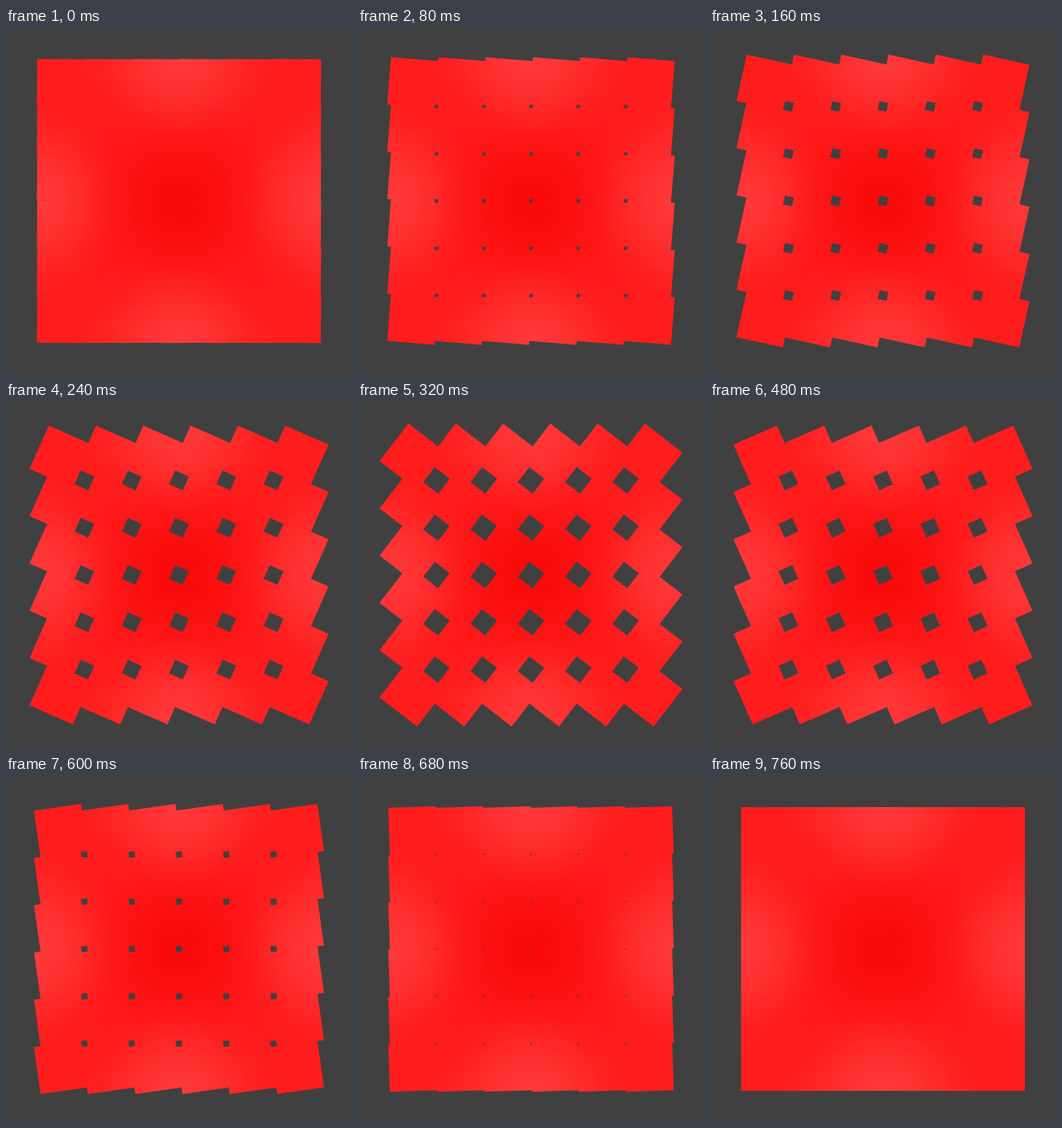
An HTML page with a canvas for the animation above (0.8 s loop, 400x400 px).

```html
<!DOCTYPE html>
<html lang="en">
<head>
<meta charset="utf-8">
<title>Turning tiles</title>
<style>
  html, body { margin: 0; width: 100%; height: 100%; overflow: hidden; background: #404040; }
  canvas { display: block; }
</style>
</head>
<body>
<canvas id="stage" width="400" height="400"></canvas>
<script>
const ctx = document.getElementById('stage').getContext('2d');
const LOOP = 800, STEP = 40, COUNT = 6, SIDE = 328 / COUNT, EDGE = 36, MID = 200;

function radial(x, y, radius, stops) {
  const g = ctx.createRadialGradient(x, y, 0, x, y, radius);
  for (const [at, color] of stops) g.addColorStop(at, color);
  return g;
}

const base = radial(MID + 3, MID + 3, 236, [
  [0, 'rgb(250,10,10)'], [0.2, 'rgb(251,12,12)'], [0.5, 'rgb(255,20,20)'], [1, 'rgb(255,30,30)']
]);
const glow = [[0, 0.15], [0.3, 0.105], [0.6, 0.035], [0.8, 0.01], [1, 0]]
  .map(([at, alpha]) => [at, `rgba(255,255,255,${alpha})`]);
const lamps = [[EDGE, MID], [400 - EDGE, MID], [MID, EDGE], [MID, 400 - EDGE]]
  .map(([x, y]) => radial(x, y, 150, glow));

// Bezier easing with handles at 0.39 and 0.61, solved by bisection
function ease(x) {
  let lo = 0, hi = 1;
  for (let i = 0; i < 30; i++) {
    const s = (lo + hi) / 2, r = 1 - s;
    if (1.17 * s * r * r + 1.83 * s * s * r + s ** 3 < x) lo = s; else hi = s;
  }
  return lo * lo * (3 - 2 * lo);
}

function addTile(path, cx, cy, angle) {
  const radius = (SIDE + 0.2) * Math.SQRT1_2;
  for (let k = 0; k < 4; k++) {
    const a = angle + Math.PI * (k / 2 + 0.25);
    path.lineTo(cx + radius * Math.cos(a), cy + radius * Math.sin(a));
  }
  path.closePath();
}

function draw(time) {
  const progress = (Math.floor(time % LOOP / STEP) + 1) * STEP / LOOP;
  const angle = ease(progress) * Math.PI / 2;
  const tiles = new Path2D();
  for (let i = 0; i < COUNT * COUNT; i++) {
    const tile = new Path2D();
    addTile(tile, EDGE + (i % COUNT + 0.5) * SIDE, EDGE + (Math.floor(i / COUNT) + 0.5) * SIDE, angle);
    tiles.addPath(tile);
  }
  ctx.globalCompositeOperation = 'source-over';
  ctx.clearRect(0, 0, 400, 400);
  ctx.fillStyle = base;
  ctx.fill(tiles);
  ctx.globalCompositeOperation = 'source-atop';
  for (const lamp of lamps) {
    ctx.fillStyle = lamp;
    ctx.fillRect(0, 0, 400, 400);
  }
}

let start;
function tick(now) {
  start ??= now;
  draw(now - start);
  requestAnimationFrame(tick);
}
requestAnimationFrame(tick);
</script>
</body>
</html>
```
